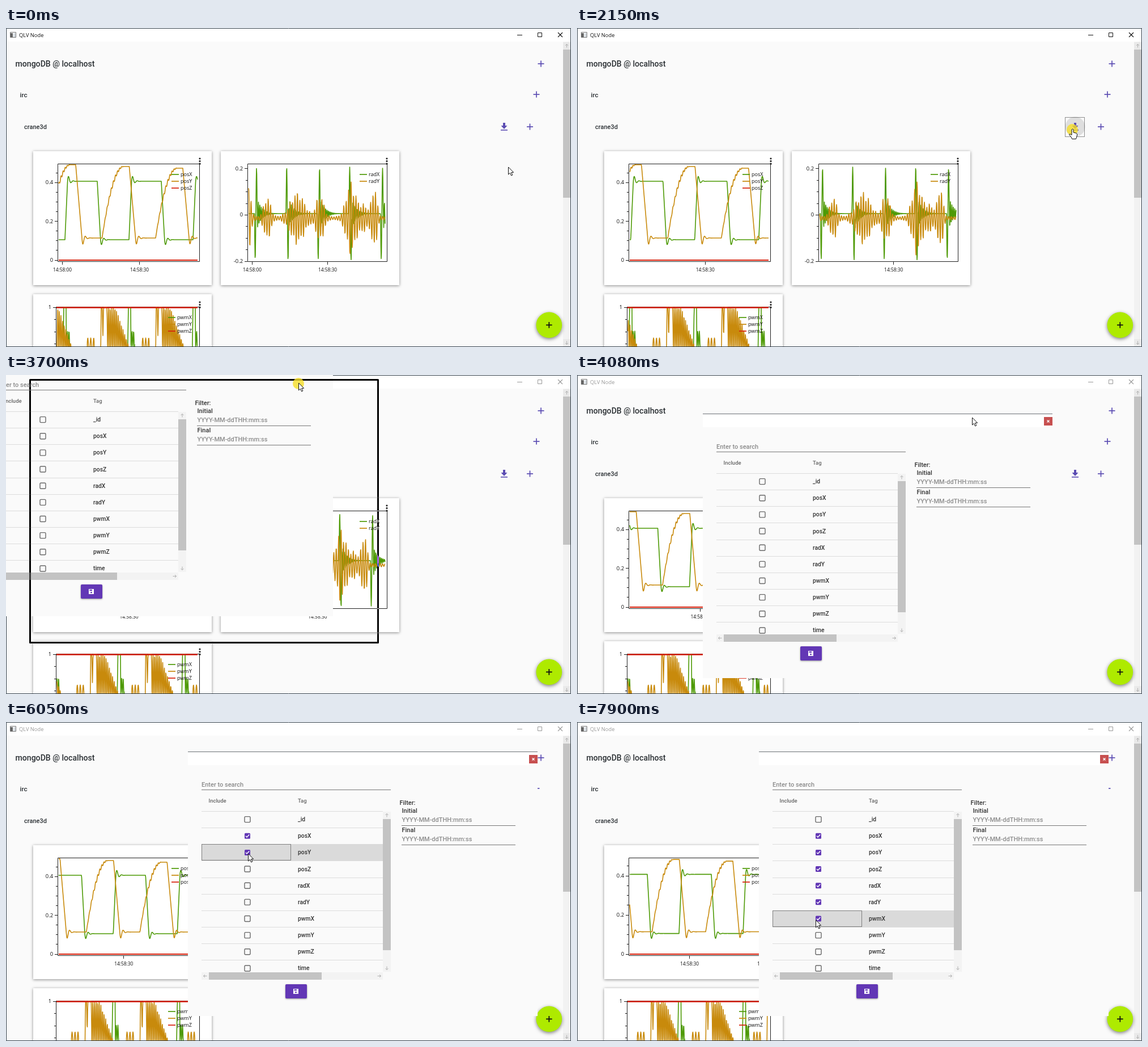
Recreate the animation shown at these times as an HTML page with a canvas. Size 997 by 562 pixels, loop 7990 ms.

```html
<!DOCTYPE html>
<html lang="en">
<head>
<meta charset="utf-8">
<title>Data export</title>
<style>
html, body { margin: 0; width: 100%; height: 100%; overflow: hidden; background: #fafafa; }
canvas { display: block; width: 997px; height: 562px; }
</style>
</head>
<body>
<canvas id="stage" width="997" height="562"></canvas>
<script>
const LOOP = 7990;
const g = document.getElementById('stage').getContext('2d');
const GREEN = '#4e9a06', ORANGE = '#c88a0c', RED = '#d8200c', PURPLE = '#5c4db3', DEEP = '#6237b5';
const ROBOTO = 'Roboto, sans-serif', SANS = '"Open Sans", sans-serif';

// ---------- drawing helpers ----------
function rect(x, y, w, h, color) { g.fillStyle = color; g.fillRect(x, y, w, h); }

function frame(x, y, w, h, color, width = 1) {
  g.strokeStyle = color; g.lineWidth = width;
  g.strokeRect(x + .5, y + .5, w, h);
}

function path(pts, color, width = 1) {
  g.beginPath();
  for (let i = 0; i < pts.length; i += 2) g.lineTo(pts[i], pts[i + 1]);
  if (color) { g.strokeStyle = color; g.lineWidth = width; g.stroke(); }
}

function disc(x, y, r, color) {
  g.beginPath(); g.arc(x, y, r, 0, 7); g.fillStyle = color; g.fill();
}

// y is the middle of the capitals
function text(s, x, y, size, color, family = ROBOTO, weight = 500, align = 'left') {
  g.font = `${weight} ${size}px ${family}`;
  g.textAlign = align; g.fillStyle = color;
  g.fillText(s, x, y + size * .36);
}

function plus(x, y, r, color, width = 1.7) {
  path([x - r, y, x + r, y], color, width);
  path([x, y - r, x, y + r], color, width);
}

function shadow(blur, dy, alpha) {
  g.shadowColor = `rgba(0,0,0,${alpha})`; g.shadowBlur = blur; g.shadowOffsetY = dy;
}
function noShadow() { g.shadowColor = 'transparent'; g.shadowBlur = g.shadowOffsetY = 0; }

function arrow(x, y, angle) {
  g.save(); g.translate(x, y); g.rotate(angle);
  path([0, 3, 0, -3], '#b0b0b0'); path([-2.5, -.5, 0, -3, 2.5, -.5], '#b0b0b0');
  g.restore();
}

function dotted(x, y, w, h) {
  g.setLineDash([1, 1]); frame(x, y, w, h, '#222'); g.setLineDash([]);
}

// ---------- signals, as heights over a time axis in pixels ----------
const clamp = v => Math.min(1, Math.max(0, v));
const bell = (d, width) => Math.exp(-((d / width) ** 2));

// 0 to 1 ramp that overshoots and settles
function settle(d, ramp) {
  const e = d - ramp;
  return e < 0 ? clamp(d / ramp) : 1 + .14 * Math.exp(-e / 3.5) * Math.sin(e * .75);
}

function posX(u) {
  let level = 0;
  for (let r = 104; r < u; r += 113) level += settle(u - r, 4.6) - settle(u - r - 57, 5.8);
  return 373 - 103 * level;
}

function posY(u) {
  const n = Math.floor((u - 75) / 94.5);
  const d = u - 75 - n * 94.5;
  const p = clamp(d / 38);
  const rise = 1 - (1 - p) ** 2 + .025 * Math.sin(Math.PI * p) * Math.sin(u * 1.7);
  return 370 - (129 - 3 * n) * (rise - settle(d - 48, 11));
}

function radX(u) {
  const n = Math.floor((u - 438.5) / 55.6);
  if (n < 0) return 327;
  const d = u - 438.5 - n * 55.6;
  if (d < 4.8) return 327 + (n % 2 ? -82 : 80) * Math.sin(d * 1.31);
  return 327 + (50 * Math.exp(-d / 4) + 14 * bell(d, 18)) * Math.sin(d * 2.5);
}

// centre, height, width
const bursts = [[428, 55, 6], [461, 38, 8], [514, 45, 17], [554, 42, 9], [608, 62, 11], [630, 22, 14], [650, 55, 6]];
function radY(u) {
  const swing = bursts.reduce((sum, [c, h, w]) => sum + h * bell(u - c, w), 3);
  return 335 + swing * Math.sin(u * 1.46 + 1.6) * (.85 + .15 * Math.sin(u * .53));
}

function pwmX(u) {
  const d = (u - 100.5) % 114;
  if (d < 0 || d > 12.5) return 580;
  return d < 6 ? 580 - 88 * clamp(d / 1.5) : 548 + 14 * Math.sin(d * 2.2);
}

function pwmY(u) {
  const start = [66, 167, 264, 372].find(r => u > r - 24 && u < r + 56);
  const d = u - start;
  if (!(d > -24)) return 580;
  if (d < 0) return d < -11 ? 562 - 16 * Math.sin((d + 24) * 1.2) : 580;
  if (d < 11) return 580 - 88 * clamp(d) + 50 * bell(d - 4, .7);
  const crest = 492 + 2.9 * Math.max(0, d - 26);
  return crest + Math.max(0, 568 - crest) * (.5 - .5 * Math.cos((d - 11) * 2.2));
}

// ---------- charts ----------
function plot(fn, x0, x1, shift, color) {
  g.beginPath();
  for (let x = x0; x <= x1; x += .5) g.lineTo(x, fn(x + shift));
  g.strokeStyle = color; g.lineWidth = 1.6; g.lineJoin = 'round'; g.stroke();
}

function card(x, y) {
  shadow(5, 1, .45); rect(x, y, 315, 236, '#fff'); noShadow();
}

function kebab(x, y) { for (let i = 0; i < 3; i++) disc(x, y + i * 4.6, 1.6, '#222'); }

function legend(x, y, names) {
  names.forEach((s, i) => {
    path([x, y + i * 12, x + 13, y + i * 12], [GREEN, ORANGE, RED][i], 1.7);
    text(s, x + 16, y + i * 12, 9, '#111', SANS, 400);
  });
}

// labels: text for every fourth tick, counted from zero
function yTicks(x, zero, gap, from, to, labels) {
  for (let i = from; i <= to; i++) {
    const y = zero - i * gap;
    rect(x - (i % 4 ? 3 : 5), Math.round(y), i % 4 ? 3 : 5, 1, '#222');
    if (labels[i]) text(labels[i], x - 8, y, 9.4, '#111', SANS, 400, 'right');
  }
}

function timeTicks(x, gap, lo, hi) {
  ['14:58:00', '14:58:30', '14:59:00'].forEach((s, i) => {
    const tx = x + i * gap;
    if (tx < lo || tx > hi) return;
    rect(Math.round(tx), 412, 1, 5, '#222');
    text(s, tx + .5, 426, 8.4, '#111', SANS, 400, 'center');
  });
}

function charts(step) {
  const s1 = step * 4.62, s2 = step * 4.4;

  card(48, 217);
  const zoom = step >= 7 ? 1.0115 : 1;
  const fit = fn => u => 408.5 - (408.5 - fn(u)) * zoom;
  frame(91, 239, 250, 172, '#222');
  yTicks(91, 408.5, 17.05 * zoom, 0, 9, { 0: '0', 4: '0.2', 8: '0.4' });
  plot(fit(posX), 93, 338, s1, GREEN);
  plot(fit(posY), 93, 338, s1, ORANGE);
  path([93, 409, 338, 409], RED, 1.8);
  timeTicks(99 - s1, 136, 92, 341);
  legend(292, 258, ['posX', 'posY', 'posZ']);
  kebab(342, 230);

  card(379, 217);
  frame(426, 239, 246, 172, '#222');
  yTicks(426, 329, 20.4, -4, 4, { [-4]: '-0.2', 0: '0', 4: '0.2' });
  plot(radX, 428, 669, s2, GREEN);
  plot(radY, 428, 669, s2, ORANGE);
  timeTicks(434 - s2, 133, 427, 672);
  legend(624, 258, ['radX', 'radY']);
  kebab(672, 230);

  card(48, 469);
  frame(88, 491, 253, 172, '#222');
  yTicks(88, 492, 21.3, -3, 0, { 0: '1' });
  plot(pwmX, 90, 338, s1, GREEN);
  plot(pwmY, 90, 338, s1, ORANGE);
  path([89, 492.5, 338, 492.5], RED, 2.4);
  legend(286, 510, ['pwmX', 'pwmY', 'pwmZ']);
  kebab(342, 483);
}

// ---------- main window ----------
function download(x, y) {
  rect(x - 2, y - 7, 4, 6, PURPLE);
  path([x - 5.5, y - 2, x + 5.5, y - 2, x, y + 4]);
  g.fill();
  rect(x - 6, y + 5, 12, 1.6, PURPLE);
}

function mainWindow(t, step) {
  const ink = t < 2390 ? '#111' : '#999';
  rect(0, 0, 997, 562, '#fafafa');
  rect(0, 0, 997, 24, '#fff');

  frame(7, 7, 10, 9, '#777'); rect(8, 9, 4, 7, '#666'); rect(13, 9, 4, 7, '#d8dde2');
  text('QLV Node', 23, 12.5, 9.3, ink, SANS, 400);
  rect(902, 12, 9, 1, ink);
  frame(938, 8, 7, 7, ink);
  path([974, 8, 982, 16], ink, 1.1); path([982, 8, 974, 16], ink, 1.1);

  text('mongoDB @ localhost', 16.5, 63, 14.1, '#2b3034');
  text('irc', 24.5, 117.5, 11.7, '#2b3034');
  text('crane3d', 32, 174.5, 11, '#2b3034');
  plus(944, 63, 5.5, PURPLE);
  plus(936, 117, 5.5, PURPLE);
  plus(924.5, 174, 5.5, PURPLE);

  if (within(t, 2150, 2390)) {
    disc(879, 174, 17.5, '#dedede');
    dotted(861, 157, 34, 34);
  }
  download(879, 174);

  charts(step);

  rect(983, 24, 13, 537, '#f2f2f2');
  rect(983, 38, 13, 261, '#c3c3c3');
  rect(983, 25, 13, 13, '#e9e9e9'); arrow(989.5, 31.5, 0);
  rect(983, 548, 13, 13, '#e9e9e9'); arrow(989.5, 554.5, Math.PI);

  shadow(6, 2, .5); disc(958.3, 523.3, 22.8, '#aeea00'); noShadow();
  plus(958.3, 523.3, 5.3, '#111', 1.8);

  frame(0, 0, 996, 561, '#34414d');
}

// ---------- dialog ----------
const tags = ['_id', 'posX', 'posY', 'posZ', 'radX', 'radY', 'pwmX', 'pwmY', 'pwmZ', 'time'];
const ROW = 29.15, TOP = 105;
const FIRST_CHECK = 5600, CHECK_GAP = 400;
const checkedRows = t => Math.min(6, Math.max(0, Math.floor((t - FIRST_CHECK) / CHECK_GAP) + 1));

function checkbox(x, y, on) {
  g.beginPath(); g.roundRect(x - 5, y - 5, 10, 10, 1.5);
  if (on) {
    g.fillStyle = DEEP; g.fill();
    path([x - 3, y, x - 1, y + 2.2, x + 3.3, y - 2.4], '#fff', 1.4);
  } else {
    g.strokeStyle = '#686868'; g.lineWidth = 1.4; g.stroke();
  }
}

function table(t, hover) {
  const checked = checkedRows(t);
  g.save();
  g.beginPath(); g.rect(24, 68, 334, 320); g.clip();
  text('Include', 36.5, 86.5, 9.5, '#666');
  text('Tag', 194, 86.5, 9.5, '#666');
  rect(24, TOP, 320, 1, '#dcdcdc');
  tags.forEach((s, i) => {
    const top = TOP + i * ROW, y = Math.round(top);
    if (i === hover) rect(24, y, 320, 29, '#dadada');
    rect(24, Math.round(top + ROW), 320, 1, '#dcdcdc');
    checkbox(105, top + 14.6, i > 0 && i <= checked);
    text(s, 194, top + 14.4, 10.3, '#333');
    if (checked && i === checked) dotted(24, y, 157, 28);
  });
  g.restore();

  rect(344, 106, 14, 282, '#f3f3f3');
  rect(344, 119, 14, 231, '#c3c3c3');
  arrow(351, 112.5, 0); arrow(351, 381.5, Math.PI);
  rect(24, 389, 320, 13, '#f3f3f3');
  rect(37, 389, 199, 13, '#c3c3c3');
  arrow(30.5, 395.5, -Math.PI / 2); arrow(337.5, 395.5, Math.PI / 2);
}

function dateField(label, y) {
  text(label, 377.5, y, 11, '#333');
  text('YYYY-MM-ddTHH:mm:ss', 377.5, y + 16.5, 11, '#8c8c8c');
  rect(377, y + 26, 201, 1, '#777');
}

function dialog(t, x, y, hover) {
  g.save();
  g.translate(x, y);
  rect(0, 0, 617, 466, '#fafafa');
  rect(0, 0, 617, 24, '#fff');
  rect(0, 0, 617, 1, '#6b7075');
  rect(602, 6, 15, 15, '#c75050');
  path([607.5, 11.5, 611.5, 15.5], '#fff', 1.2); path([611.5, 11.5, 607.5, 15.5], '#fff', 1.2);

  text('Enter to search', 24, 58, 11, '#8a8a8a');
  rect(24, 67, 334, 1, '#777');
  table(t, hover);

  text('Filter:', 373.5, 90.5, 11, '#333');
  dateField('Initial', 104);
  dateField('Final', 138);

  shadow(3, 1, .4);
  g.beginPath(); g.roundRect(172, 410, 38, 25, 2); g.fillStyle = DEEP; g.fill();
  noShadow();
  rect(186, 418, 9, 9, '#fff');
  rect(187.5, 419, 4.5, 2.2, DEEP); disc(190.5, 424.2, 1.4, DEEP);
  g.restore();
}

// Outline shown while dragging inverts what lies below
function dragOutline(x, y) {
  g.globalCompositeOperation = 'difference';
  g.strokeStyle = '#fafafa'; g.lineWidth = 3;
  g.strokeRect(x + 1.5, y + 1.5, 614, 463);
  g.globalCompositeOperation = 'source-over';
}

// ---------- pointer ----------
const within = (t, a, b) => t >= a && t < b;
const STEP = 78;

// Share of a move done, advancing once per screen capture
const progress = (t, from, steps) => clamp((Math.floor((t - from) / STEP + .01) + 1) / steps);

// start, steps, x, y
const moves = [
  [820, 4, 874, 178], [2780, 4, 435, -34], [3540, 3, 516, 14], [3780, 3, 697, 75],
  [4320, 3, 692, 78], [4630, 4, 791, 62], [5030, 5, 428, 203]
];

function pointerAt(t) {
  let x = 886, y = 245;
  for (const [from, steps, mx, my] of moves) {
    const f = progress(t, from, steps);
    x += (mx - x) * f; y += (my - y) * f;
  }
  // one row down after each check
  for (let i = 0; i < 5; i++) {
    const f = progress(t, FIRST_CHECK + i * CHECK_GAP + 100, 3);
    x -= 1.3 * f; y += ROW * f;
  }
  return [Math.round(x), Math.round(y)];
}

function pressed(t) {
  const ahead = t + STEP;
  return within(t, 2150, 2230) || within(t, 3540, 4080) || within(t, 4630, 4950) ||
    checkedRows(ahead) > checkedRows(t);
}

function pointer(x, y, hand) {
  g.save();
  g.translate(x, y);
  if (hand) {
    g.beginPath();
    g.moveTo(-1, 1);
    g.quadraticCurveTo(.5, -1.5, 2, 1);
    g.lineTo(2, 6); g.lineTo(7, 7.2);
    g.quadraticCurveTo(9, 8, 8.5, 11);
    g.lineTo(6.5, 17.5); g.lineTo(-.5, 17.5);
    g.lineTo(-2, 14); g.lineTo(-5.5, 10);
    g.quadraticCurveTo(-5, 7.5, -1, 10.5);
  } else {
    path([.5, 0, .5, 13, 3.5, 10.3, 5.6, 15, 7.8, 14, 5.7, 9.5, 9.6, 9.3]);
  }
  g.closePath();
  g.lineJoin = 'miter';
  g.fillStyle = '#fff'; g.fill();
  g.strokeStyle = '#111'; g.lineWidth = 1; g.stroke();
  g.restore();
}

// ---------- timeline ----------
function draw(t) {
  const [x, y] = pointerAt(t);
  mainWindow(t, Math.max(0, Math.floor((t - 350) / 1005) + 1));
  if (t >= 2390) {
    const [dx, dy] = t < 4080 ? [-40, -41] : t < 4950 ? [222, 68] : [321, 52];
    const row = Math.floor((y - dy - TOP) / ROW);
    const inside = t >= 4950 && x > dx + 24 && x < dx + 344;
    dialog(t, dx, dy, inside ? row : -1);
  }
  if (within(t, 3540, 4080)) dragOutline(x - 475, y - 7);
  if (within(t, 4630, 4950)) dragOutline(x - 470, y - 10);
  if (pressed(t)) disc(x, y + 1, 10, 'rgba(246,222,40,.8)');
  pointer(x, y, within(t, 1050, 2620));
}

const start = performance.now();
function tick(now) {
  draw(Math.max(0, now - start) % LOOP);
  requestAnimationFrame(tick);
}
draw(0);
requestAnimationFrame(tick);
</script>
</body>
</html>
```
